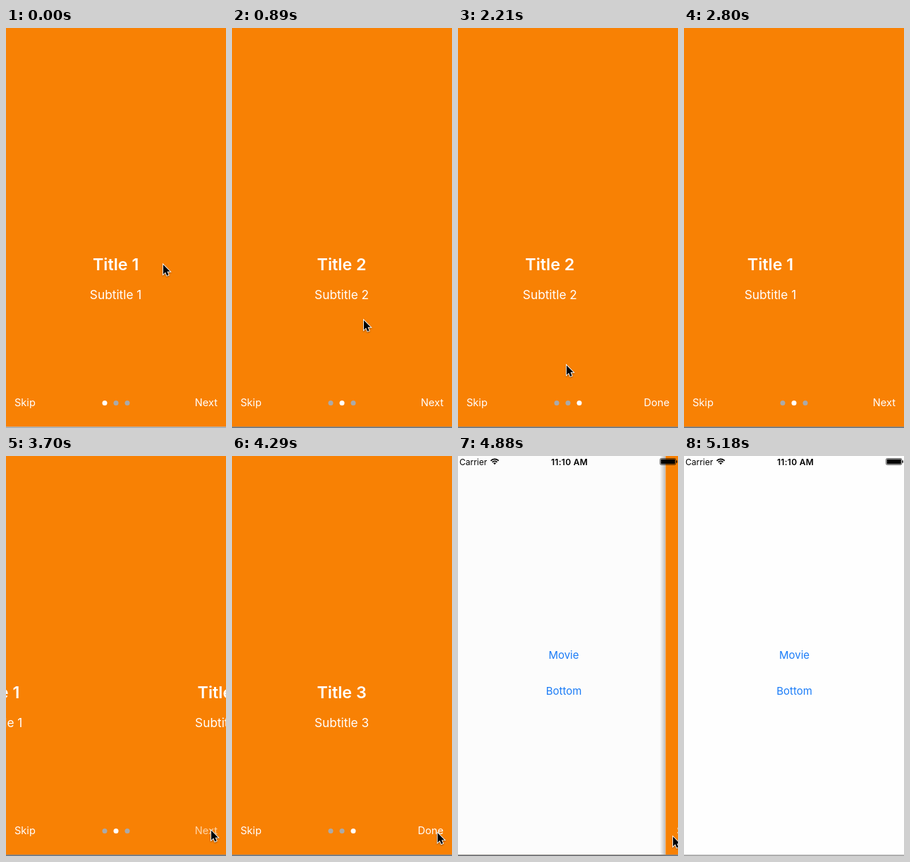
An HTML page with a canvas for the animation above (5.28 s loop, 312 px wide and 568 px high).

```html
<!DOCTYPE html>
<html lang="en">
<head>
<meta charset="utf-8">
<title>Walkthrough</title>
<style>
html, body { margin: 0; width: 312px; height: 568px; overflow: hidden; background: #fefefe; }
canvas { display: block; }
</style>
</head>
<body>
<canvas id="stage" width="312" height="568"></canvas>
<script>
const ctx = document.getElementById('stage').getContext('2d');
const W = 312, H = 568, PAGE = 320, MID = 156, INSET = 4;
const LOOP = 5280, STEP = 147.2; // the picture is held for one step at a time
const ORANGE = '#f88104', BLUE = '#1a7cf8';

// All times below are in steps. A swipe updates the dots when it ends, a tap at once.
const swipe = (start, by) => ({ start, by, span: 4, switchAt: start + 4 });
const tap = (start, by) => ({ start, by, span: 2, switchAt: start, tapped: true });
const moves = [swipe(2, 1), swipe(7, 1), swipe(11.9, -1), swipe(16, -1),
  tap(23.97, 1), tap(26.97, 1), tap(30.97, 0)];
const POP_START = 31, POP_SPAN = 2.54;

// Key places of the pointer: time, x, y.
const pointerPath = [[0, 222, 335], [2, 224, 336], [4, 120, 385], [6, 186, 414], [11, 50, 470],
  [15, 153, 478], [18, 330, 460], [24, 290, 530], [32, 291, 537], [35, 330, 545]];

function ease(u) {
  u = Math.min(1, Math.max(0, u));
  return u ** 3 * (u * (6 * u - 15) + 10);
}

function state(k) {
  let scroll = 0, page = 0, buttonAlpha = 1;
  for (const m of moves) {
    const age = k - m.start;
    scroll += m.by * PAGE * ease(age / m.span);
    if (k >= m.switchAt) page += m.by;
    if (m.tapped && age >= 0) buttonAlpha = Math.min(1, 0.3 + 0.35 * age);
  }
  return { scroll, page, buttonAlpha, pop: ease((k - POP_START) / POP_SPAN) };
}

function pointerAt(k) {
  const i = Math.max(1, pointerPath.findIndex(p => p[0] >= k));
  const a = pointerPath[i - 1], b = pointerPath[i];
  const u = (k - a[0]) / (b[0] - a[0]);
  return [a[1] + (b[1] - a[1]) * u, a[2] + (b[2] - a[2]) * u];
}

function text(str, x, y, size, color, align = 'center', weight = 400, spacing = 0) {
  ctx.font = `${weight} ${size}px Inter, sans-serif`;
  ctx.letterSpacing = spacing + 'px';
  ctx.textAlign = align;
  ctx.fillStyle = color;
  ctx.fillText(str, x, y);
}

function rect(x, y, w, h, color) {
  ctx.fillStyle = color;
  ctx.fillRect(x, y, w, h);
}

function drawRoot(pop) {
  const x = MID + 0.5 - 0.3 * PAGE * (1 - pop);
  rect(0, 0, W, H, '#fefefe');
  text('Movie', x, 288, 15, BLUE);
  text('Bottom', x, 339, 15, BLUE);
  rect(0, 0, W, H, `rgba(0,0,0,${0.1 * (1 - pop)})`);
}

function drawIntro({ scroll, page, buttonAlpha, pop }) {
  ctx.save();
  ctx.translate(pop * PAGE, 0);
  const shade = ctx.createLinearGradient(-INSET - 8, 0, -INSET, 0);
  shade.addColorStop(0, 'rgba(0,0,0,0)');
  shade.addColorStop(1, 'rgba(0,0,0,.25)');
  rect(-INSET - 8, 0, 8, H, shade);

  ctx.beginPath();
  ctx.rect(-INSET, 0, PAGE, H);
  ctx.clip();
  rect(-INSET, 0, PAGE, H, ORANGE);

  for (let i = 0; i < 3; i++) {
    const x = MID - 0.4 + i * PAGE - scroll;
    text(`Title ${i + 1}`, x, 344, 23.3, '#fff', 'center', 600);
    text(`Subtitle ${i + 1}`, x, 385, 17.3, '#fff');
    ctx.fillStyle = i === page ? '#fff' : '#aaa';
    ctx.beginPath();
    ctx.arc(MID + 16 * (i - 1), 532.5, 3.5, 0, 7);
    ctx.fill();
  }
  text('Skip', 12, 537, 14.6, '#fff', 'left');
  ctx.globalAlpha = buttonAlpha;
  text(page === 2 ? 'Done' : 'Next', 300, 537, 14.6, '#fff', 'right');
  ctx.restore();
}

function wifiArc(radius) {
  ctx.beginPath();
  ctx.arc(52, 12, radius, -Math.PI * 0.76, -Math.PI * 0.24);
}

function drawStatusBar() {
  text('Carrier', 2, 12.5, 12, '#000', 'left');
  text('11:10 AM', 158, 12.5, 12, '#000', 'center', 600, 0.3);

  ctx.strokeStyle = '#000';
  ctx.lineWidth = 1.7;
  for (const radius of [4.6, 7.6]) {
    wifiArc(radius);
    ctx.stroke();
  }
  wifiArc(2.6);
  ctx.lineTo(52, 12.3);
  ctx.fill();

  ctx.lineWidth = 0.6;
  ctx.beginPath();
  ctx.roundRect(286.5, 3.5, 22.4, 9, 1.8);
  ctx.stroke();
  rect(287.6, 4.6, 20.2, 6.8, '#000');
  rect(309.4, 6.3, 1.4, 3.4, '#000');
}

const arrow = new Path2D('M.5 .5V15.7L4 12.4 6.3 18 9 16.9 6.7 11.4H11.3Z');

function drawPointer(x, y) {
  ctx.save();
  ctx.translate(x + 0.5, y + 0.5);
  ctx.scale(0.9, 0.9);
  ctx.shadowColor = 'rgba(0,0,0,.4)';
  ctx.shadowBlur = 2;
  ctx.shadowOffsetY = 1;
  ctx.strokeStyle = '#fff';
  ctx.lineWidth = 2;
  ctx.stroke(arrow);
  ctx.shadowColor = 'transparent';
  ctx.fillStyle = '#000';
  ctx.fill(arrow);
  ctx.restore();
}

function draw(k) {
  const now = state(k);
  if (now.pop > 0) drawRoot(now.pop);
  if (now.pop < 1) drawIntro(now);
  if (now.pop > 0) drawStatusBar();

  const idle = k < 3 || k > 33;
  rect(0, 566, W, 1, idle ? '#b9b9b9' : '#8b8780');
  rect(0, 567, W, 1, idle ? '#a8a8a8' : '#70747c');
  drawPointer(...pointerAt(k));
}

function tick() {
  draw(Math.floor(performance.now() % LOOP / STEP));
  requestAnimationFrame(tick);
}
tick();
</script>
</body>
</html>
```
